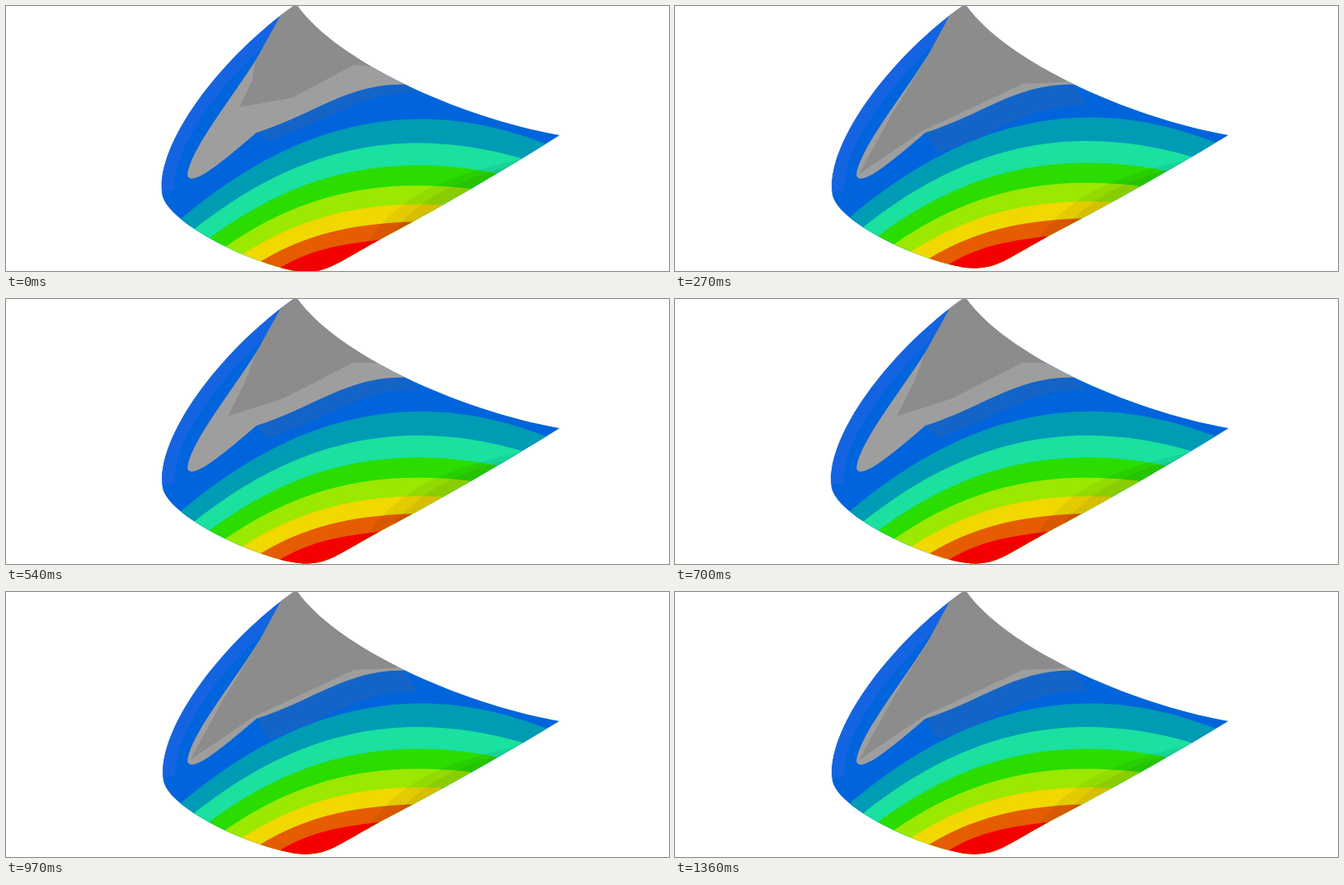
Write an HTML page with a canvas that moves like this. It is 800x320 px and loops after 1390 ms.

```html
<!DOCTYPE html>
<html lang="en">
<head>
<meta charset="utf-8">
<title>Contour plot</title>
<style>
html, body { margin: 0; width: 100%; height: 100%; overflow: hidden; background: #fff; }
canvas { display: block; }
</style>
</head>
<body>
<canvas id="stage" width="800" height="320"></canvas>
<script>
const ctx = document.getElementById('stage').getContext('2d');
const LOOP = 1390;
// [time, steps done]: the pace is even between these moments
const pace = [[0, 0], [584, 12], [790, 18], [1150, 24], [LOOP, 30]];

const pts = s => s.split(' ').map(p => p.split(',').map(Number));
const clamp = v => Math.max(0, Math.min(1, v));
const mix = (a, b, k) => a + (b - a) * k;
const mixPts = (a, b, k) => a.map((p, i) => p.map((v, j) => mix(v, b[i][j], k)));
const shift = (p, dx, dy) => p.map(([x, y]) => [x + dx, y + dy]);

// Chains of cubic curves: start, then two handles and an end for each
const topEdge = pts('351,-1 398,66 545,134 668,156');
const lowEdge = pts('668,156 600,199 510,251 453,281 405,307 390,321 362,321 318,321 188,263 188,224');
const leftEdge = pts('188,224 183,162 262,60 347,0');
const grayLeft = pts('331,12 305,75 222,165 219,205');
const grayFoot = pts('219,205 225,220 268,182 302,153');
const grayLow = pts('302,153 370,132 415,92 482,95');
const shade = pts('410,330 455,232 520,205 645,180');

// Inner gray corner, relaxed and at full load
const innerRest = pts('304,62 262,130 222,203 300,150 420,94 470,92');
const innerFull = pts('301,66 297,90 282,122 345,111 420,71 440,73');

const colors = ['#009bb4', '#1ae0a0', '#2adc00', '#9be800', '#f0d800', '#e65c00', '#f40000'];

// Upper limit of band k: start, handles and end drift smoothly from band to band
function bandLine(k) {
  const q = (a, b, c) => a + b * k + c * k * k;
  return [
    [q(211, 15.5, 0.75), q(257, 12.8, -0.5)],
    [q(335, -2, 1.4), q(152, 34, -1.8)],
    [q(480, -22, 1.7), q(98, 40, -1.4)],
    [q(655, -30.5, -0.5), q(168, 16, 0.5)]
  ];
}

function line(p, join) {
  p.forEach(([x, y], i) => ctx[i || join ? 'lineTo' : 'moveTo'](x, y));
}

function curve(p, join) {
  line(p.slice(0, 1), join);
  for (let i = 1; i < p.length; i += 3) ctx.bezierCurveTo(...p[i], ...p[i + 1], ...p[i + 2]);
}

function fill(color, trace) {
  ctx.fillStyle = color;
  ctx.beginPath();
  trace();
  ctx.closePath();
  ctx.fill();
}

// Moves the rim with the load; u is 1 at full deformation
function bend(p, u) {
  return p.map(([x, y]) => {
    const w = clamp((y - 150) / 110) * clamp((x - 211) / 130);
    return [x + (x < 215 ? 1.5 * (1 - u) : 0), y - 4.5 * (1 - u) * w];
  });
}

function draw(u) {
  const left = bend(leftEdge, u);
  ctx.fillStyle = '#fff';
  ctx.fillRect(0, 0, 800, 320);
  ctx.save();
  ctx.beginPath();
  curve(topEdge);
  curve(bend(lowEdge, u), true);
  curve(left, true);
  ctx.clip();

  ctx.fillStyle = '#0064dc';
  ctx.fillRect(180, 0, 500, 320);
  ctx.strokeStyle = '#1464e1';
  ctx.lineWidth = 30;
  ctx.beginPath();
  curve(left);
  ctx.stroke();
  fill('#1464c8', () => {
    curve(grayLow);
    curve(shift(grayLow, 15, mix(25, 10, u)).reverse(), true);
  });

  colors.forEach((color, k) => fill(color, () => {
    curve(shift(bandLine(k), 0, -(2 + 0.4 * k) * (1 - u)));
    line([[700, 340], [180, 340]], true);
  }));

  // Light falls off towards the right, in two soft layers
  for (const dx of [0, 22]) {
    fill('rgba(0,0,0,.06)', () => {
      curve(shift(shade, dx, 0));
      line([[690, 340]], true);
    });
  }

  fill('#9e9e9e', () => {
    curve(grayLeft);
    curve(grayFoot, true);
    curve(grayLow, true);
    line([[500, 80], [351, -20]], true);
  });
  fill('#8c8c8c', () => {
    line([[331, 12]]);
    line(mixPts(innerFull, innerRest, (1 - u) ** 1.3), true);
    line([[500, 60], [351, -20]], true);
  });
  ctx.restore();
}

function stepAt(t) {
  const i = pace.findIndex(([end]) => end > t);
  const [t0, s0] = pace[i - 1], [t1, s1] = pace[i];
  return Math.floor(mix(s0, s1, (t - t0) / (t1 - t0)));
}

let shown = -1;
function tick(now) {
  // The load climbs in four steps, then drops back
  const step = (stepAt(now % LOOP) + 3) % 4;
  if (step !== shown) draw((shown = step) / 3);
  requestAnimationFrame(tick);
}
tick(performance.now());
</script>
</body>
</html>
```
